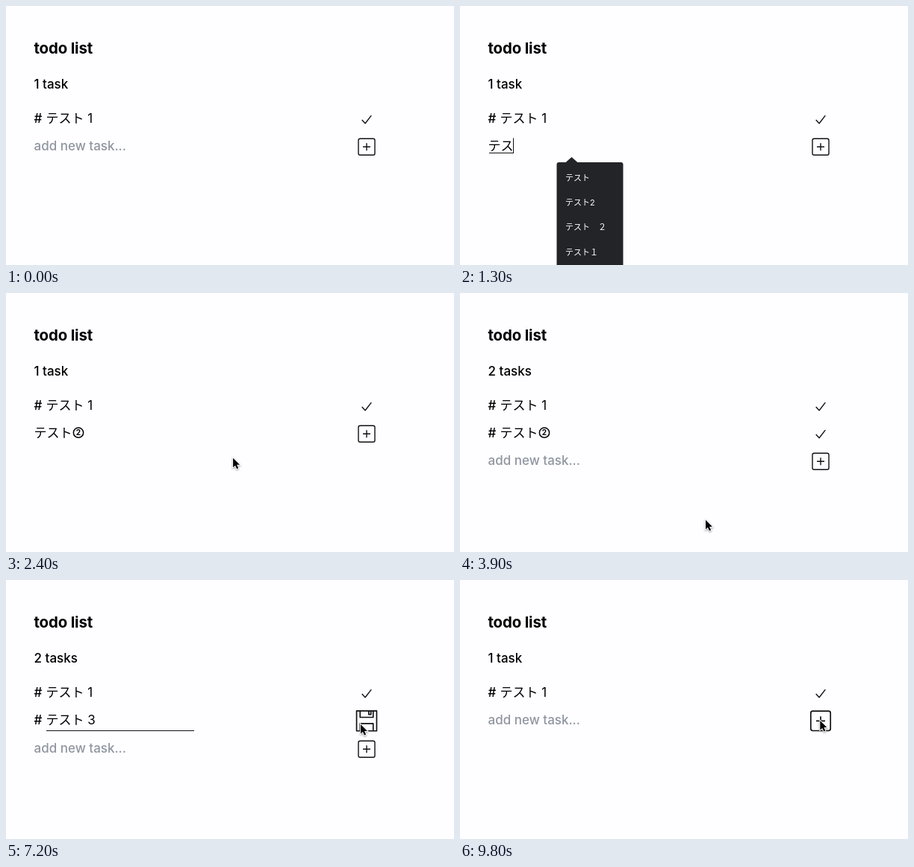
Recreate the animation shown at these times as an HTML page. Size 600 by 348 pixels, loop 10 s.

```html
<!DOCTYPE html>
<html lang="ja">
<head>
<meta charset="utf-8">
<title>todo list</title>
<style>
  html, body { margin: 0; width: 100%; height: 100%; overflow: hidden; background: #fefdff; }
  svg { display: block; width: 100%; height: 100%; font-family: Inter, "Noto Sans CJK JP", "Noto Sans CJK", sans-serif; }
  .icon { fill: none; stroke: #111; stroke-width: 1.4; stroke-linejoin: round; }
  .pointer { fill: #000; stroke: #fff; stroke-width: 1.8; paint-order: stroke; filter: drop-shadow(0 1px 1px #0006); }
</style>
</head>
<body>
<svg id="stage" viewBox="0 0 600 348"></svg>
<script>
const LOOP = 10000, TICK = 100;
const SIZE = 17, LEFT = 37.5, LABEL = 53.5, FIRST_ROW = 157, PITCH = 37;
const ICON_X = 483, ICON_LIFT = 4.7, HOVER_SCALE = 1.2;
const GREY = '#8f96a1';

const entrySteps = ['', 'ｔ', 'テ', 'テｓ', 'テス', 'テスｔ', 'テスト', 'テスト２', 'テスト②'];
const editSteps = ['テスト②', 'テスト', 'テスト', 'テスト ', 'テスト 3'];

// The pointer eases from each stop to the next.
const pointerStart = [208, 239];
const moves = [
  { start: 2200, end: 2700, to: [481, 190] },
  { start: 3000, end: 3200, to: [413, 322] },
  { start: 3300, end: 3500, to: [329, 305] },
  { start: 3900, end: 4400, to: [145, 187] },
  { start: 6400, end: 6900, to: [479, 192] },
  { start: 7000, end: 7200, to: [475, 194] },
  { start: 8200, end: 8300, to: [425, 200] },
  { start: 8300, end: 8500, to: [482.3, 189] }
];

const shapes = {
  check: '<path d="M-6.3 .8L-1.9 5.4L6.3 -5.2"/>',
  plus: '<rect x="-11" y="-11" width="22" height="22" rx="2.2"/><path d="M-5 0H5M0 -5V5"/>',
  disk: '<path d="M-11.2 -11.2H11.2V11.2H-11.2ZM-7.3 -11.2V-4H7.3V-11.2M2.4 -11V-7.2H4.8V-11M-7.3 11.2V3H7.3V11.2"/>'
};

const clamp = (v, low, high) => Math.min(high, Math.max(low, v));
const ease = p => p * p * (3 - 2 * p);
const during = (t, from, to) => t >= from && t < to;
const typing = (steps, start, t) =>
  steps[clamp(Math.floor((t - start) / TICK) + 1, 0, steps.length - 1)];

function pointerAt(t) {
  const visible = during(t, 2300, 5400) || t >= 6500;
  return visible && moves.reduce((pos, { start, end, to }) => {
    const p = ease(clamp((t - start) / (end - start), 0, 1));
    return pos.map((v, i) => v + (to[i] - v) * p);
  }, pointerStart);
}

const text = (x, y, content, { size = SIZE, color = '#000', weight = 500, extra = '' } = {}) =>
  `<text x="${x}" y="${y}" font-size="${size}" fill="${color}" font-weight="${weight}" xml:space="preserve" ${extra}>${content}</text>`;

const line = (x1, y1, x2, y2) => `<path d="M${x1} ${y1}L${x2} ${y2}" stroke="#111"/>`;
const caret = (x, baseline) => line(x, baseline - 16.5, x, baseline + 4);

// Full-width text; the circled two is a ring around a digit.
function label(x, y, content, size = SIZE, color = '#000') {
  const ring = content.indexOf('②');
  let out = text(x, y, content.replace('②', ''), { size, color, weight: 400 });
  if (ring >= 0) {
    const cx = x + (ring + .5) * size, cy = y - .37 * size;
    out += `<circle cx="${cx}" cy="${cy}" r="${.39 * size}" fill="none" stroke="${color}" stroke-width="${.09 * size}"/>`
      + text(cx, cy + .215 * size, '2', { size: .59 * size, color, weight: 700, extra: 'text-anchor="middle"' });
  }
  return out;
}

function icon(name, baseline, pointer) {
  const y = baseline - ICON_LIFT;
  const hovered = pointer && Math.hypot(pointer[0] - ICON_X, pointer[1] - y) < 14;
  return `<g class="icon" transform="translate(${ICON_X} ${y}) scale(${hovered ? HOVER_SCALE : 1})">${shapes[name]}</g>`;
}

function popup(x, y, items) {
  return `<g transform="translate(${x} ${y})"><path d="M11 1L20 -7L29 1Z" fill="#222427"/>`
    + '<rect width="89" height="160" rx="3" fill="#222427"/>'
    + items.map((item, i) => label(11.5, 24.5 + i * 33.4, item, 11, '#fff')).join('') + '</g>';
}

const task = (y, name) => text(LEFT, y, '#') + label(LABEL, y, name);

function editor(t, y) {
  const name = typing(editSteps, 6000, t);
  const caretOn = t < 6000 ? Math.floor((t - 5400) / 200) % 2 === 0 : t < 6500;
  const spaces = name.split(' ').length - 1;
  const end = name.length > 3 + spaces || name.includes('②') ? 121.5 : 105 + 4.8 * spaces;
  return line(54, y + 8.5, 252, y + 8.5) + (caretOn ? caret(end, y) : '');
}

function entryField(t, y) {
  const entry = t < 3900 ? typing(entrySteps, 1000, t) : '';
  const end = LEFT + entry.length * SIZE;
  return (entry ? label(LEFT, y, entry) : text(LEFT, y, 'add new task...', { color: GREY }))
    + (entry && t < 2000 ? line(39, y + 3.5, end, y + 3.5) : '')
    + (during(t, 200, 2200) ? caret(end, y) : '');
}

function scene(t) {
  const two = during(t, 3900, 9700);
  const editing = during(t, 5400, 7900);
  const pointer = pointerAt(t);
  const secondRow = FIRST_ROW + PITCH;
  const inputRow = two ? secondRow + PITCH + editing : secondRow;

  let out = text(LEFT, 64, 'todo list', { size: 20.4, weight: 700, extra: 'letter-spacing="-.15"' })
    + text(LEFT, 111, two ? '2 tasks' : '1 task')
    + task(FIRST_ROW, 'テスト 1') + icon('check', FIRST_ROW, pointer);
  if (two) out += task(secondRow, typing(editSteps, 6000, t)) + icon(editing ? 'disk' : 'check', secondRow, pointer);
  if (editing) out += editor(t, secondRow);
  out += entryField(t, inputRow) + icon('plus', inputRow, pointer);

  if (during(t, 500, 1600)) out += popup(129.5, 210, ['テスト', 'テスト2', 'テスト　２', 'テスト１']);
  if (during(t, 6000, 6300)) out += popup(132.5, 211, ['テスト', 'テスト2', 'テスト②', 'テスト　２']);
  if (pointer) out += `<path class="pointer" transform="translate(${pointer})" d="M0 0V12.5L2.9 9.9L5 14.6L7.1 13.7L5.1 9.1H9Z"/>`;
  return out;
}

const stage = document.getElementById('stage');
const start = performance.now();
let shown = '';
function draw() {
  const elapsed = (performance.now() - start) % LOOP;
  const next = scene(Math.floor(elapsed / TICK) * TICK);
  if (next !== shown) stage.innerHTML = shown = next;
  requestAnimationFrame(draw);
}
draw();
</script>
</body>
</html>
```
